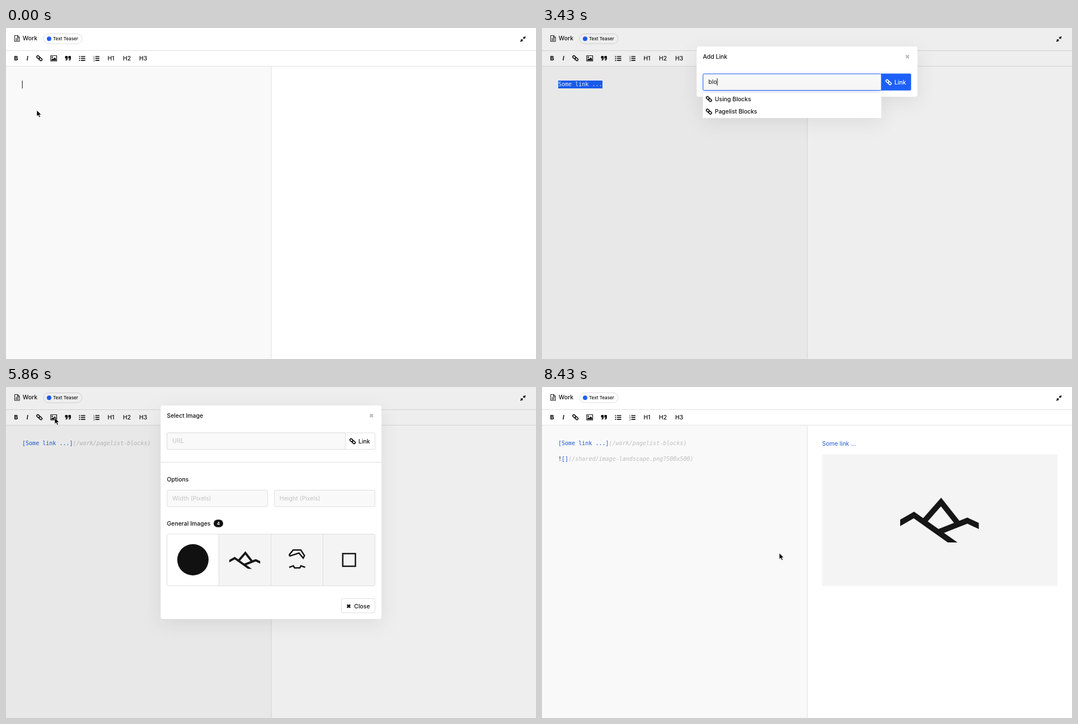
An HTML page for the animation above (8570 ms loop, 947 px wide and 592 px high).

```html
<!DOCTYPE html>
<html lang="en">
<head>
<meta charset="utf-8">
<title>Markdown editor</title>
<style>
html, body { margin: 0; width: 100%; height: 100%; overflow: hidden; background: #fff; }
svg { display: block; width: 100%; height: 100%; }
text { font: 500 10.45px Inter, sans-serif; fill: #111; white-space: pre; }
.mono { font: 400 10.04px "DejaVu Sans Mono", monospace; }
.body { font-weight: 400; font-size: 10.5px; }
.input { font-weight: 400; font-size: 10.6px; }
.hint { font-weight: 400; font-size: 10.6px; fill: #c2c2c2; }
.path { fill: #bdbdbd; font-style: italic; }
.blue { fill: #1d57d6; }
.white { fill: #fff; }
</style>
</head>
<body>
<svg id="stage" viewBox="0 0 947 592">
  <defs>
    <filter id="soft" x="-30%" y="-60%" width="160%" height="260%">
      <feDropShadow dx="0" dy="8" stdDeviation="16" flood-color="#000" flood-opacity=".08"/>
    </filter>
    <filter id="glow" x="-20%" y="-80%" width="140%" height="300%">
      <feDropShadow dx="0" dy="3" stdDeviation="4" flood-color="#1c60f8" flood-opacity=".2"/>
    </filter>
    <clipPath id="crop"><rect x="640" y="190" width="140.5" height="88"/></clipPath>
    <g id="chain" fill="none" stroke="currentColor" stroke-width="1.6">
      <g transform="rotate(42)">
        <rect x="-5.7" y="-2" width="6" height="4" rx="2"/>
        <rect x="-.3" y="-2" width="6" height="4" rx="2"/>
      </g>
    </g>
    <path id="cross" d="M-2.7-2.7L2.7 2.7M2.7-2.7L-2.7 2.7" stroke="currentColor" stroke-width="2.4"/>
    <g id="hill" fill="none" stroke="#161616" stroke-width="10" clip-path="url(#crop)">
      <path d="M634 246.5L664.5 229L745 286M682 241L713 205.7L744 245M707 260L760 239L786 251"/>
    </g>
  </defs>

  <rect width="947" height="592" fill="#fff"/>
  <rect y="68" width="474" height="524" fill="#f9f9f9"/>
  <path d="M0 40.5H947M0 68.3H947M474 68V592" stroke="#e0e0e0" fill="none"/>

  <g fill="none" stroke="#222">
    <path d="M15.5 13.5H20.8L24 16.7V24H15.5ZM20.5 13.5V17H24" stroke-width="1.1"/>
    <path d="M17.3 18.6H22.2M17.3 20.4H22.2M17.3 22.2H22.2" stroke-width=".9"/>
  </g>
  <text x="29.7" y="22.3">Work</text>
  <rect x="67" y="10.5" width="69" height="17.6" rx="8.8" fill="#fff" stroke="#dcdcdc"/>
  <circle cx="77" cy="19.3" r="4" fill="#1c60f8"/>
  <text x="84" y="22.3" style="font-size:8.05px">Text Teaser</text>
  <path d="M924.2 19.2V15.2L925.5 16.5L927.3 14.7L928.8 16.2L927 18L928.3 19.3ZM923.3 20.3V24.4L922 23.1L920.2 24.9L918.7 23.4L920.5 21.6L919.2 20.3Z" fill="#111"/>

  <text x="14.5" y="58" style="font-weight:800">B</text>
  <text x="36.7" y="58" style="font-weight:700;font-style:italic">I</text>
  <use id="linkIcon" href="#chain" x="59.7" y="54"/>
  <g id="imageIcon" fill="currentColor">
    <path d="M80 49.5H90.5V58.9H80Z" fill="none" stroke="currentColor" stroke-width="1.2"/>
    <circle cx="82.7" cy="52.2" r="1.2"/>
    <path d="M81.2 57.7V56.2L83.2 54.2L84.4 55.4L87 52.6L89.4 55V57.7Z"/>
  </g>
  <path id="quotes" fill="#111"/>
  <path id="lists" stroke="#111" stroke-width="1.7" fill="none"/>
  <g style="font-weight:600">
    <text x="156" y="52.5" style="font-size:4px">1</text>
    <text x="156" y="56" style="font-size:4px">2</text>
    <text x="156" y="59.5" style="font-size:4px">3</text>
  </g>
  <text x="181.4" y="58">H1</text>
  <text x="209" y="58">H2</text>
  <text x="238" y="58">H3</text>

  <rect id="selection" y="94" height="14" fill="#1c60f8"/>
  <text id="code" class="mono" x="29" y="104"></text>
  <text id="imageCode" class="mono" x="29" y="132"><tspan>!</tspan><tspan class="blue">[]</tspan><tspan class="path">(/shared/image-landscape.png?500x500)</tspan></text>
  <rect id="caret" width="1" height="14" fill="#111"/>
  <text id="preview" class="body" x="500.5" y="105.3"></text>
  <g id="picture">
    <rect x="500.5" y="120.5" width="420.5" height="235.3" fill="#f4f4f4"/>
    <use href="#hill"/>
  </g>

  <rect id="shade" width="947" height="592" fill="#000"/>

  <g id="linkModal">
    <rect x="276.4" y="33" width="394.4" height="90" rx="4" fill="#fff" filter="url(#soft)"/>
    <text x="287.5" y="55">Add Link</text>
    <use href="#cross" x="653" y="51.3" color="#bbb"/>
    <rect x="287.8" y="82" width="318.5" height="29.5" rx="2" fill="#f8f8f8" stroke="#1c60f8" filter="url(#glow)"/>
    <path d="M606 81.5H657.5Q659.5 81.5 659.5 83.5V109.8Q659.5 111.8 657.5 111.8H606Z" fill="#1c60f8"/>
    <use href="#chain" x="619.3" y="97" color="#fff"/>
    <text x="629.8" y="100.8" class="white">Link</text>
    <text id="query" x="297.3" y="100.2"></text>
    <rect id="queryCaret" y="90" width="1" height="13" fill="#111"/>
    <g id="menu">
      <rect x="287.5" y="115.5" width="318.7" height="45.5" fill="#fff" filter="url(#soft)"/>
      <rect id="choice" x="287.5" width="318.7" height="22.7" fill="#1c60f8"/>
      <g id="item0"><use href="#chain" x="298.3" y="127"/><text x="308.8" y="130.8" style="fill:currentColor">Using Blocks</text></g>
      <g id="item1"><use href="#chain" x="298.3" y="149.5"/><text x="308.8" y="153.4" style="fill:currentColor">Pagelist Blocks</text></g>
    </g>
  </g>

  <g id="imageModal">
    <rect x="276.4" y="33" width="394.4" height="382" rx="4" fill="#fff" filter="url(#soft)"/>
    <text x="287.5" y="55">Select Image</text>
    <use href="#cross" x="653" y="51.3" color="#bbb"/>
    <rect x="287.8" y="82" width="371.5" height="29.5" rx="2" fill="#fff" stroke="#dedede"/>
    <rect x="287.8" y="82" width="318.5" height="29.5" rx="2" fill="#f9f9f9" stroke="#dedede"/>
    <text x="297.3" y="100.2" class="hint">URL</text>
    <use href="#chain" x="619.3" y="97"/>
    <text x="629.8" y="100.8">Link</text>
    <path d="M276.4 134.5H670.8" stroke="#dedede"/>
    <text x="287.5" y="169">Options</text>
    <rect id="widthBox" x="287.8" y="184.5" width="179.5" height="29.5" rx="2" fill="#f9f9f9"/>
    <rect id="heightBox" x="479.7" y="184.5" width="179.5" height="29.5" rx="2" fill="#f9f9f9"/>
    <text id="widthText" x="297.3" y="202.8"></text>
    <text id="heightText" x="488.8" y="202.8"></text>
    <rect id="fieldCaret" y="192.5" width="1" height="13" fill="#111"/>
    <g id="spinner">
      <rect x="640.5" y="192.5" width="9" height="13" rx="2" fill="#efefef"/>
      <path d="M642.5 197.6L645 194.5L647.5 197.6ZM642.5 200.6L645 203.7L647.5 200.6Z" fill="#222"/>
    </g>
    <text x="287.5" y="248">General Images</text>
    <rect x="371" y="237.3" width="17" height="13.4" rx="6.7" fill="#111"/>
    <text x="379.5" y="247" text-anchor="middle" class="white" style="font-size:8px;font-weight:600">4</text>
    <rect x="287.8" y="263" width="371.5" height="92.5" rx="2" fill="#f4f4f4"/>
    <rect x="287.8" y="263" width="92.6" height="92.5" fill="#fff"/>
    <path d="M380.5 263V355.5M473.5 263V355.5M566.5 263V355.5" stroke="#dedede"/>
    <rect x="287.8" y="263" width="371.5" height="92.5" rx="2" fill="none" stroke="#dedede"/>
    <circle cx="334" cy="309" r="28" fill="#111"/>
    <use href="#hill" transform="translate(426.6 309.5) scale(.393) translate(-710.3 -238)"/>
    <g fill="none" stroke="#161616" stroke-width="2.5">
      <path d="M506.5 302.5V299.5L513.2 291.5H526.8L533.3 301.5L531 306L523.5 297L506.5 302.5"/>
      <path d="M506 322.5L513.5 319.8L515.5 323.5H525L527 319.8L534.5 322.5"/>
      <rect x="601.7" y="298" width="22.6" height="22.6"/>
    </g>
    <rect x="599.3" y="378.5" width="60" height="25.3" rx="2.5" fill="#fff" stroke="#dedede"/>
    <use href="#cross" x="612.3" y="392"/>
    <text x="622" y="395.7">Close</text>
  </g>

  <path id="mouse" d="M0 0V11.2L2.6 8.8L4.4 12.9L6.3 12L4.6 8.1H8Z" fill="#000" stroke="#fff" stroke-width=".7"/>
</svg>
<script>
const LOOP = 8570, STEPS = 60, CHAR = 6.04, BLUE = "#1c60f8";
const $ = id => document.getElementById(id);
const set = (id, attrs) => { for (const k in attrs) $(id).setAttribute(k, attrs[k]); };
const show = (id, on) => { $(id).style.display = on ? "" : "none"; };
const put = (id, text) => { $(id).textContent = text; };
const clamp = (v, a = 0, b = 1) => Math.min(b, Math.max(a, v));
const span = (cls, s) => `<tspan class="${cls}">${s}</tspan>`;
const within = (n, a, b) => n >= a && n < b;

const LINE = "Some link ...";
const LINK = span("blue", `[${LINE}]`) + span("path", "(/work/pagelist-blocks)");

set("quotes", { d: [105.5, 111.3].map(x =>
  `M${x} 51.2q0-1.2 1.2-1.2h2.3q1.2 0 1.2 1.2v3q0 3.8-3.7 4v-1.7q1.6-.2 1.6-1.8h-1.4q-1.2 0-1.2-1.2Z`).join("") });
set("lists", { d: [51, 54.4, 57.8].map(y =>
  `M130.5 ${y}h2M134 ${y}h7.6M159.6 ${y}h7.3`).join("") });

// Pointer trips: first step, end of visibility, travel steps, start and goal.
const TRIPS = [
  [0, 1, 1, 55, 147, 55, 147],
  [17, 22, 2, 55, 147, 62, 55],
  [37, 46, 1, 62, 55, 87, 55],
  [53, 60, 2, 335, 198, 424, 297]
];
const FIELD_TRIP = [42, 46, 2, 87, 55, 335, 198];

function pointer(n) {
  const trip = within(n, 42, 46) ? FIELD_TRIP : TRIPS.find(p => within(n, p[0], p[1]));
  show("mouse", trip);
  if (!trip) return;
  const [from, , len, x0, y0, x1, y1] = trip;
  const p = clamp((n - from) / len), e = p * p * (3 - 2 * p);
  set("mouse", { transform: `translate(${x0 + (x1 - x0) * e} ${y0 + (y1 - y0) * e})` });
}

// Opacity of a dialog that is half way at both steps given.
function fade(n, open, close) {
  if (n < open || n > close) return 0;
  return n === open ? .65 : n === close ? .5 : 1;
}

function dialog(id, amount) {
  show(id, amount > 0);
  set(id, { opacity: amount, transform: `translate(0 ${-64 * (1 - amount)})` });
}

function editor(n) {
  const linked = n >= 31;
  const typed = n < 5 ? n : Math.min(LINE.length, n + 1);
  const picked = n < 13 ? 0 : clamp([2, 7, 12][n - 13] || 13, 0, 13);
  const cut = LINE.length - picked;
  const text = LINE.slice(0, typed);
  show("selection", picked && !linked);
  set("selection", { x: 29 + cut * CHAR, width: picked * CHAR + .5 });
  $("code").innerHTML = linked ? LINK
    : picked ? span("", LINE.slice(0, cut)) + span("white", LINE.slice(cut)) : text;
  put("preview", text);
  $("preview").setAttribute("class", linked ? "body blue" : "body");
  show("caret", n < 13 || within(n, 36, 40));
  set("caret", n < 13 ? { x: 28.7 + typed * CHAR, y: 94 } : { x: 28.7, y: 121.5 });
  show("imageCode", n >= 58);
  show("picture", n >= 58);
  const hover = (id, on) => { $(id).style.color = on ? BLUE : "#111"; };
  hover("linkIcon", n === 19 || within(n, 32, 38));
  hover("imageIcon", within(n, 38, 40));
}

function linkDialog(n) {
  const word = n >= 29 ? "/work/pagelist-blocks" : "block".slice(0, clamp(n - 21, 0, 5));
  $("query").setAttribute("class", word ? "input" : "hint");
  put("query", word || "Start typing a page title or paste an external link here");
  set("queryCaret", { x: 297.2 + (word ? $("query").getComputedTextLength() : 0) });
  show("menu", within(n, 23, 29));
  const active = n >= 28 ? 1 : n === 27 ? 0 : -1;
  show("choice", active >= 0);
  set("choice", { y: active ? 138.2 : 115.5 });
  [0, 1].forEach(i => { $("item" + i).style.color = i === active ? "#fff" : "#111"; });
}

function field(name, value, hint, focus) {
  put(name + "Text", value || hint);
  $(name + "Text").setAttribute("class", value ? "" : "hint");
  set(name + "Box", { stroke: focus ? BLUE : "#dedede", filter: focus ? "url(#glow)" : "none" });
  if (focus) {
    const x = +$(name + "Text").getAttribute("x");
    set("fieldCaret", { x: x + (value ? $(name + "Text").getComputedTextLength() : -.3) });
  }
}

function imageDialog(n) {
  const onWidth = within(n, 45, 49), onHeight = n >= 49;
  show("fieldCaret", onWidth || onHeight);
  show("spinner", onHeight);
  field("width", "500".slice(0, clamp(n - 45, 0, 3)), "Width (Pixels)", onWidth);
  field("height", n < 50 ? "" : n < 51 ? "50" : "500", "Height (Pixels)", onHeight);
}

function draw(ms) {
  const n = Math.floor((ms % LOOP + 6) / (LOOP / STEPS)) % STEPS;
  const a = fade(n, 20 - 1, 31), b = fade(n, 40, 57);
  editor(n);
  set("shade", { opacity: .066 * Math.max(a, b) });
  dialog("linkModal", a);
  dialog("imageModal", b);
  if (a) linkDialog(n);
  if (b) imageDialog(n);
  pointer(n);
}

const start = performance.now();
function loop() {
  draw(performance.now() - start);
  requestAnimationFrame(loop);
}
draw(0);
requestAnimationFrame(loop);
</script>
</body>
</html>
```
